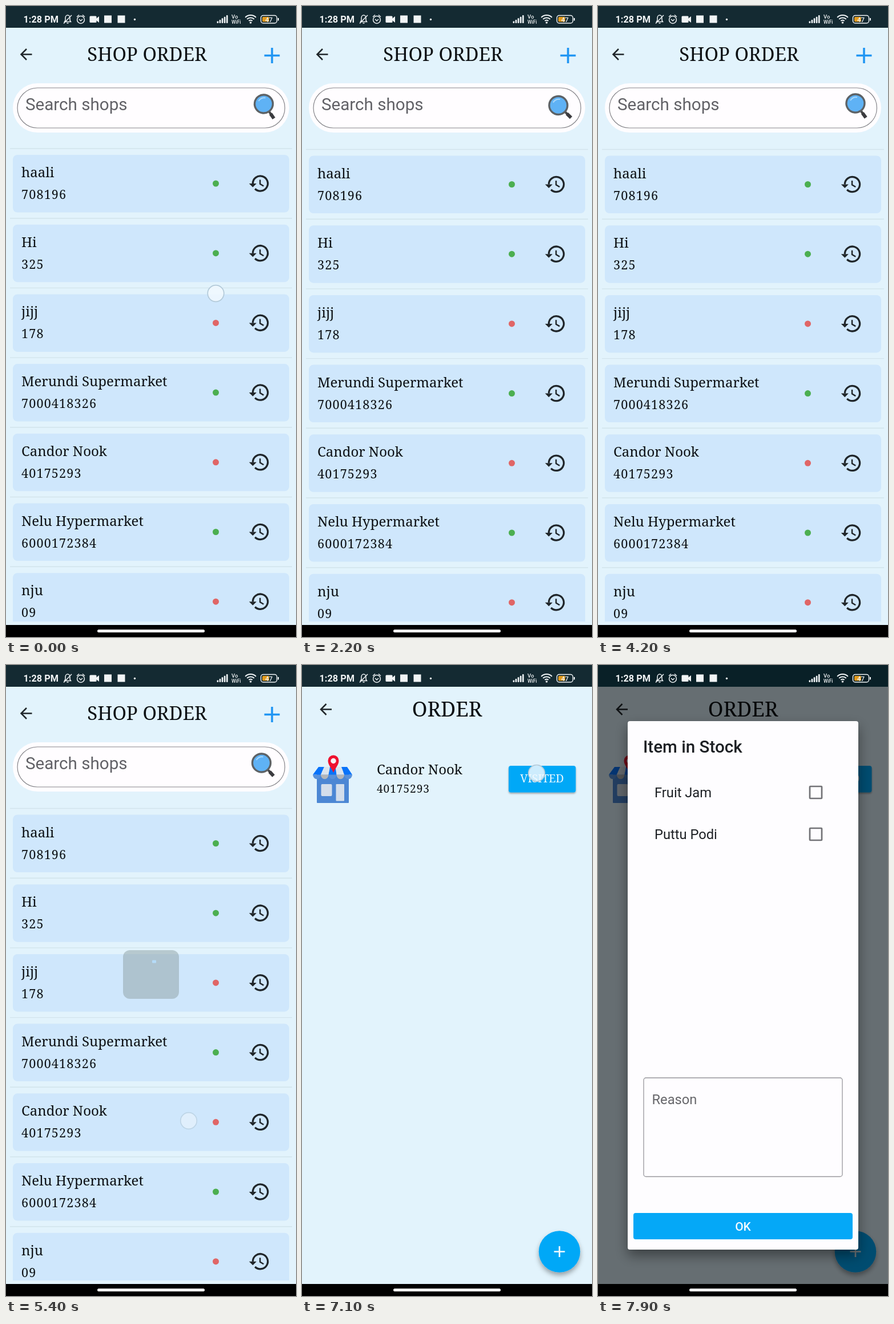
Animation, 508 px wide and 1102 px high, one loop 8 s. Source, as an HTML page:

```html
<!DOCTYPE html>
<html lang="en">
<head>
<meta charset="utf-8">
<title>Shop order</title>
<style>
  html, body { margin: 0; width: 100%; height: 100%; overflow: hidden; background: #e2f3fc; }
  svg { display: block; width: 100vw; height: 100vh; }
  text { font-family: Roboto, sans-serif; fill: #1d2024; }
  .serif { font-family: "Noto Serif", serif; fill: #0c1013; }
  .mid { text-anchor: middle; }
  .line { fill: none; stroke: #20262a; }
  .white { fill: none; stroke: #eef2f4; stroke-width: 1.5; }
</style>
</head>
<body>
<svg id="stage" viewBox="0 0 508 1102" xmlns="http://www.w3.org/2000/svg"></svg>
<script>
const LOOP = 8000, STEP = 100, SEARCH_LOOP = 3800;
const BLUE = '#05a8f7', PAGE = '#e2f3fc', GREEN = '#4caf50', RED = '#e06666';

const shops = [
  ['haali', '708196', GREEN],
  ['Hi', '325', GREEN],
  ['jijj', '178', RED],
  ['Merundi Supermarket', '7000418326', GREEN],
  ['Candor Nook', '40175293', RED],
  ['Nelu Hypermarket', '6000172384', GREEN],
  ['nju', '09', RED],
];
const chosen = shops[4];

const rect = (x, y, w, h, r, attrs) =>
  `<rect x="${x}" y="${y}" width="${w}" height="${h}" rx="${r}" ${attrs}/>`;
const circle = (x, y, r, attrs) => `<circle cx="${x}" cy="${y}" r="${r}" ${attrs}/>`;
const path = (d, attrs) => `<path d="${d}" ${attrs}/>`;
const text = (x, y, size, words, attrs = '') =>
  `<text x="${x}" y="${y}" font-size="${size}" ${attrs}>${words}</text>`;
const serif = (x, y, size, words, attrs = '') => text(x, y, size, words, `class="serif" ${attrs}`);
const title = (x, y, size, words) =>
  `<text class="serif mid" x="${x}" y="${y}" font-size="${size}">${words}</text>`;
const backArrow = (x, y) =>
  path(`M${x + 20} ${y}h-19m9.5 -9.5l-9.5 9.5l9.5 9.5`, 'class="line" stroke-width="2.5"');

const historyIcon = y => `<g transform="translate(443 ${y}) scale(1.64) translate(-11.5 -12)">
  ${path('M5 12a8 8 0 1 1 2.35 5.65', 'class="line" stroke-width="2"')}
  ${path('M1 12h8l-4 4z', 'fill="#20262a"')}
  ${path('M12.75 8v4.5l3.8 2.25', 'class="line" stroke-width="1.5"')}</g>`;

function shopRow([name, number, color], i) {
  const y = 261.5 + i * 121.7;
  return path(`M7 ${y - 11}H501`, 'stroke="#d2e4ec" stroke-width="1.4"') +
    rect(12, y, 484, 100.5, 8, 'fill="#cfe7fc"') +
    serif(27, y + 39, 24, name) +
    serif(27, y + 77, 21.5, number, 'letter-spacing="1.2"') +
    circle(367.5, y + 50, 5.5, `fill="${color}"`) + historyIcon(y + 50);
}

const magnifier = `
  ${path('M17 0H30', 'stroke="#444" stroke-width="4"')}
  ${path('M21 0H31', 'stroke="#3b3b3f" stroke-width="6"')}
  ${circle(0, 0, 16, 'fill="#5fb2f5" stroke="#5d6266" stroke-width="3.4"')}`;

const listPage = `
  ${rect(0, 38, 508, 1043, 0, `fill="${PAGE}"`)}
  ${backArrow(25.5, 84.5)}
  ${title(247, 96, 33, 'SHOP ORDER')}
  ${path('M452.5 86.500h27m-13.500 -13.500v27', 'stroke="#2196f3" stroke-width="3.6"')}
  ${rect(12, 135, 484, 86, 43, 'fill="#fffdff"')}
  ${rect(20, 143, 468.5, 70, 35, 'fill="none" stroke="#85858a" stroke-width="1.2"')}
  ${text(34, 182, 29.6, 'Search shops', 'style="fill:#626267"')}
  <g id="lens">${magnifier}</g>
  <path id="glint" d="M-9 -5a11 11 0 0 1 12 -5.500" fill="none" stroke="#a9d8fb" stroke-width="2"/>
  <g clip-path="url(#listArea)"><g id="list">${shops.map(shopRow).join('')}</g></g>
  <g id="loader">
    ${rect(205, 498, 98, 85, 12, 'fill="#90a4a8" fill-opacity=".52"')}
    ${rect(256, 515.5, 7, 5, 1, 'fill="#b5dbf8"')}
  </g>`;

function awning(i) {
  const blue = i % 2 === 0;
  const top = 29 + i * 10, bottom = 19 + i * 13.8;
  return path(`M${bottom} 191.500a6.900 7.800 0 0 0 13.800 0z`, `fill="${blue ? '#5891db' : '#b3b5b8'}"`) +
    path(`M${top} 178h10L${bottom + 13.8} 191.500h-13.800z`, `fill="${blue ? '#0873fa' : '#dbe4ee'}"`);
}

const storeIcon = rect(26, 187, 56, 54, 1, 'fill="#4c87d4"') +
  rect(33.500, 208, 19, 21, 2, 'fill="#d3deeb"') +
  rect(59.500, 208, 14.500, 29.500, 1, 'fill="#d3deeb"') +
  [0, 1, 2, 3, 4].map(awning).join('') +
  path('M55 188C52 180 45.500 175 45.500 167a9.500 9.500 0 0 1 19 0C64.500 175 58 180 55 188z', 'fill="#ee1230"') +
  circle(55, 167.500, 4.700, 'fill="#f6f3f6"');

const orderPage = `
  ${rect(0, 38, 508, 1043, 0, `fill="${PAGE}"`)}
  ${backArrow(32, 77.5)}
  ${title(254, 90, 36, 'ORDER')}
  ${storeIcon}
  ${serif(131, 191, 24, chosen[0])}
  ${serif(131, 223, 19, chosen[1], 'letter-spacing="1"')}
  ${rect(362, 176, 117.5, 46.5, 4, `fill="${BLUE}" filter="url(#low)"`)}
  ${title(420.5, 205, 19.5, 'VISITED').replace('<text', '<text style="fill:#eefaff"')}
  <g id="fab">
    ${circle(0, 0, 36.3, `fill="${BLUE}" filter="url(#mid)"`)}
    ${path('M-9.500 0h19m-9.500 -9.500v19', 'stroke="#f2fbff" stroke-width="2.7"')}
  </g>`;

const checkRow = (y, words) => text(99, y + 8.5, 23.7, words) +
  rect(371, y - 10.5, 21, 21, 1, 'fill="none" stroke="#737377" stroke-width="2.7"');

const dialog = `
  ${rect(52, 98, 404, 923, 4, 'fill="#fefdff" filter="url(#high)"')}
  ${text(79, 153, 29.6, 'Item in Stock', 'font-weight="500"')}
  ${checkRow(222.5, 'Fruit Jam')}
  ${checkRow(295.5, 'Puttu Podi')}
  ${rect(80, 721, 348, 172.5, 4, 'fill="none" stroke="#97979c" stroke-width="1.3"')}
  ${text(94.5, 767, 23.7, 'Reason', 'style="fill:#67676b"')}
  ${rect(62, 957, 384, 46, 4, `fill="${BLUE}"`)}
  ${text(254, 987.5, 21, 'OK', 'class="mid" font-weight="500" style="fill:#f4fbff"')}`;

const signal = [0, 1, 2, 3, 4].map(i =>
  rect(369.5 + i * 4.1, 26.5 - i * 2.6, 2.7, 3.5 + i * 2.6, 1, 'fill="#eef2f4"')).join('');
const wifi = [4, 8, 12].map(r =>
  path(`M${428.5 - r * .78} ${29 - r * .75}a${r * 1.1} ${r * 1.1} 0 0 1 ${r * 1.56} 0`,
    'class="white" style="stroke-width:2"')).join('') + circle(428.5, 29, 1.8, 'fill="#eef2f4"');
const light = 'style="fill:#f1f4f5"';

const statusBar = `
  ${rect(0, 0, 508, 38, 0, 'fill="#142a32"')}
  <rect id="statusShade" width="508" height="38" fill="#00181f"/>
  ${text(30.5, 29, 16.3, '1:28 PM', `font-weight="700" ${light}`)}
  ${path('M102.500 27.500h11l-1.500 -2.500v-4a4 5 0 0 0 -8 0v4zM106.500 30h3M101 30.500L115 16', 'class="white"')}
  ${circle(131, 24, 6.4, 'class="white"')}
  ${path('M124 19l4 -3.500M138 19l-4 -3.500M128 23l3 3l3 -3', 'class="white"')}
  ${rect(146.5, 17.5, 12, 11.5, 1.5, 'fill="#f1f4f5"')}
  ${path('M158 22l5 -4v11l-5 -4z', 'fill="#f1f4f5"')}
  ${rect(172, 16.500, 13, 13, 0, 'fill="#f1f4f5"')}
  ${rect(195.500, 16.500, 13, 13, 0, 'fill="#f1f4f5"')}
  ${circle(225.5, 23.5, 1.7, 'fill="#f1f4f5"')}
  ${signal}
  ${text(395, 22, 9.500, 'Vo', `font-weight="500" ${light}`)}
  ${text(395, 30.500, 8.500, 'WiFi', `font-weight="500" ${light}`)}
  ${wifi}
  ${rect(446.5, 16.5, 28, 13.500, 4, 'class="white"')}
  ${rect(449, 19, 12, 8.500, 1.5, 'fill="#e29a1c"')}
  ${path('M477 21v4.500', 'class="white" style="stroke-width:2"')}
  ${text(460.5, 27.5, 11.5, '47', `class="mid" font-weight="500" ${light}`)}`;

const shadow = (id, dy, blur, alpha) => `<filter id="${id}" x="-30%" y="-30%" width="160%" height="160%">
  <feDropShadow dx="0" dy="${dy}" stdDeviation="${blur}" flood-color="#000" flood-opacity="${alpha}"/></filter>`;

document.getElementById('stage').innerHTML = `
  <defs>
    <clipPath id="listArea"><rect y="230" width="508" height="845"/></clipPath>
    ${shadow('low', 2, 1.8, .35)}${shadow('mid', 5, 4.5, .35)}${shadow('high', 10, 11, .42)}
  </defs>
  ${listPage}
  <g id="order">${orderPage}</g>
  <rect id="scrim" y="38" width="508" height="1043" fill="#000"/>
  <g id="dialog">${dialog}</g>
  <g id="touch">${circle(0, 0, 14.3, 'fill="#f1f8fe" fill-opacity=".85" stroke="#b3cad9" stroke-width="1.7"')}</g>
  ${statusBar}
  ${rect(0, 1081, 508, 21, 0, 'fill="#000"')}
  ${rect(160, 1089, 188, 5, 2.5, 'fill="#fff"')}`;

const part = {};
document.querySelectorAll('[id]').forEach(el => { part[el.id] = el; });

// Linear interpolation over [time, value] keys
function track(t, keys) {
  const next = keys.findIndex(key => key[0] > t);
  if (next === 0) return keys[0][1];
  if (next < 0) return keys[keys.length - 1][1];
  const [t0, a] = keys[next - 1], [t1, b] = keys[next];
  return a + (b - a) * (t - t0) / (t1 - t0);
}

const lensKeys = [[0, 451.5, 171, 55], [400, 451, 170, 54], [1600, 447.5, 171, 47],
  [2200, 449, 173.5, 44], [3800, 451.5, 171, 55]];

const taps = [
  { x: 367.5, y: 502, keys: [[0, 1], [100, 1], [400, 0]] },
  { x: 320, y: 796, keys: [[4900, 0], [5000, 1], [5200, 1], [5400, .6], [5600, 0]] },
  { x: 411, y: 189, keys: [[6900, 0], [7000, 1], [7200, 1], [7300, .7], [7500, 0]] },
];

const place = (el, x, y, more = '') => el.setAttribute('transform', `translate(${x} ${y}) ${more}`);
function fade(el, alpha) {
  el.setAttribute('opacity', alpha);
  el.setAttribute('visibility', alpha > 0 ? 'visible' : 'hidden');
}

function render(t) {
  const [x, y, angle] = [1, 2, 3].map(n => track(t % SEARCH_LOOP, lensKeys.map(k => [k[0], k[n]])));
  place(part.lens, x, y, `rotate(${angle})`);
  place(part.glint, x, y);
  place(part.list, 0, track(t, [[0, -1.5], [100, -.8], [300, 0]]));

  fade(part.loader, track(t, [[5000, 0], [5200, 1], [5500, 1], [5600, 0]]));
  fade(part.order, track(t, [[5500, 0], [5700, 1]]));
  place(part.fab, 451, 1024.5, `scale(${track(t, [[5600, 0], [5900, 1]])})`);

  const shade = track(t, [[7100, 0], [7200, .5], [7300, .92], [7400, 1]]);
  fade(part.scrim, shade * .545);
  fade(part.statusShade, shade * .55);
  fade(part.dialog, track(t, [[7100, 0], [7200, .3], [7300, .87], [7400, 1]]));

  const tap = taps.find(({ keys }) => t <= keys[keys.length - 1][0]) || taps[2];
  place(part.touch, tap.x, tap.y);
  fade(part.touch, track(t, tap.keys));
}

const start = performance.now();
function tick() {
  const t = (performance.now() - start) % LOOP;
  render(Math.floor(t / STEP) * STEP);
  requestAnimationFrame(tick);
}
tick();
</script>
</body>
</html>
```
